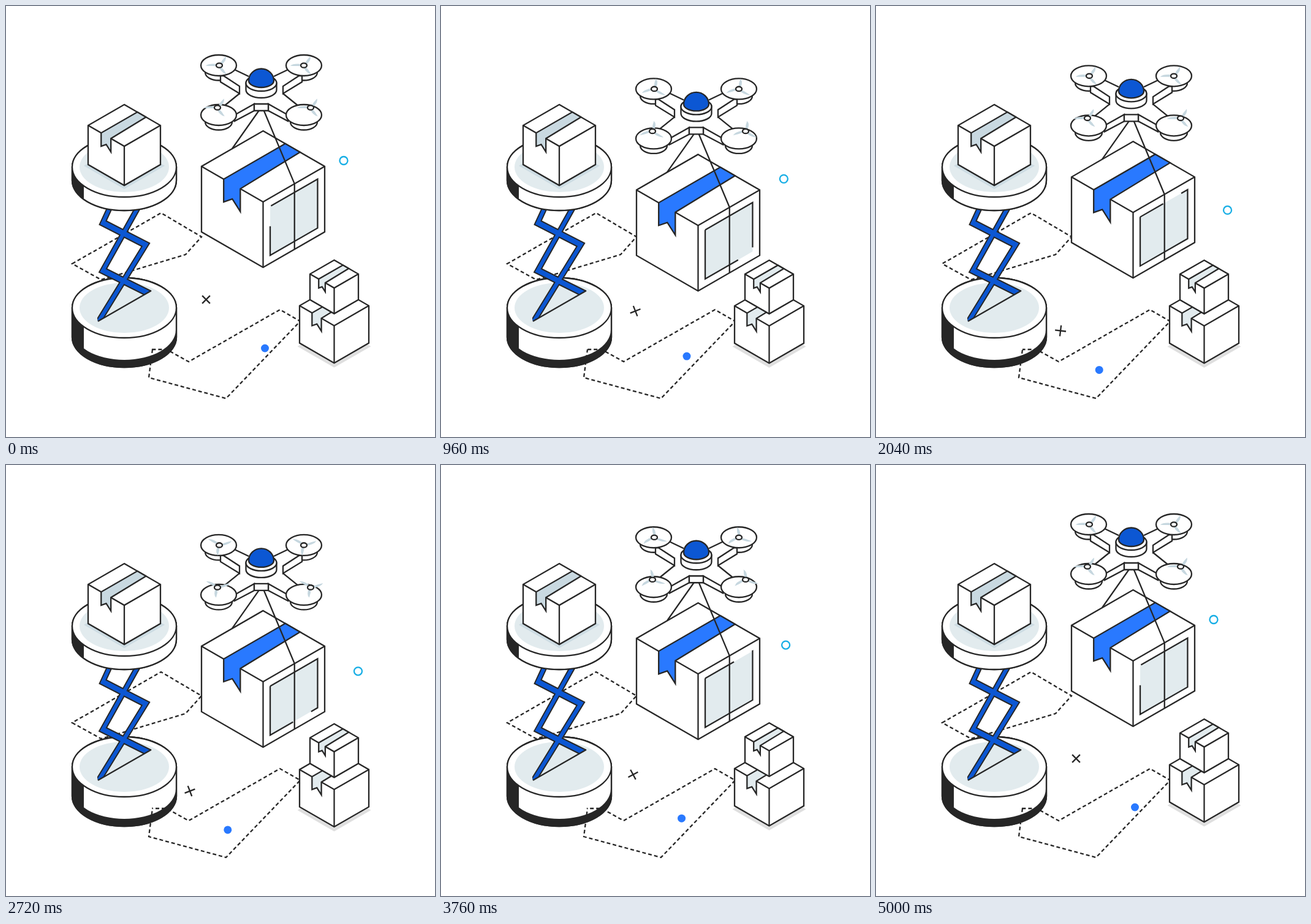
Recreate the animation shown at these times as an HTML page with a canvas. Size 700 px wide and 704 px high, loop 5040 ms.

```html
<!DOCTYPE html>
<html lang="en">
<head>
<meta charset="utf-8">
<title>Drone delivery</title>
<style>
html, body { margin: 0; width: 100%; height: 100%; overflow: hidden; background: #fff; }
canvas { display: block; }
</style>
</head>
<body>
<canvas id="stage" width="700" height="704"></canvas>
<script>
const ctx = document.getElementById('stage').getContext('2d');
const LOOP = 5040, SPAN = 5000, STEP = 40;
const TURN = Math.PI * 2, ISO = 0.577, LINE = 2.3;
const INK = '#262626', BLUE = '#0c57d3', BRIGHT = '#2979ff', PALE = '#e2ebee', TAPE = '#c9d9e1';

const smooth = u => u * u * (3 - 2 * u);

// Eased swing from 0 to 1 and back.
function swing(t, period, peak = period / 2) {
  const p = t % period;
  return smooth(p < peak ? p / peak : (period - p) / (period - peak));
}

function paint(fill, stroke, width = LINE) {
  if (fill) { ctx.fillStyle = fill; ctx.fill(); }
  if (stroke) { ctx.strokeStyle = stroke; ctx.lineWidth = width; ctx.stroke(); }
}

function trace(points, closed) {
  ctx.beginPath();
  for (const [x, y] of points) ctx.lineTo(x, y);
  if (closed) ctx.closePath();
}

function poly(points, fill, stroke = INK) {
  trace(points, true);
  paint(fill, stroke);
}

function line(...points) {
  trace(points, false);
  paint(null, INK);
}

function ellipse(x, y, rx, ry, fill, stroke = INK) {
  ctx.beginPath();
  ctx.ellipse(x, y, rx, ry, 0, 0, TURN);
  paint(fill, stroke);
}

// Outline of an upright solid with a round top and a round foot.
function capsule(x, y, rx, ry, h, fill, stroke = INK, footRy = ry) {
  ctx.beginPath();
  ctx.ellipse(x, y, rx, ry, 0, Math.PI, TURN);
  ctx.ellipse(x, y + h, rx, footRy, 0, 0, Math.PI);
  ctx.closePath();
  paint(fill, stroke);
}

function at(x, y, draw) {
  ctx.save();
  ctx.translate(x, y);
  draw();
  ctx.restore();
}

function diamond(x, y, r, fill) {
  const d = r * ISO;
  poly([[x, y - d], [x + r, y], [x, y + d], [x - r, y]], fill, null);
}

// Isometric carton; the tape runs over the top and ends in a notched flap.
function parcel(x, top, r, h, tape) {
  const d = r * ISO, mid = top + d, low = mid + d;
  poly([[x, top], [x + r, mid], [x + r, mid + h], [x, low + h], [x - r, mid + h], [x - r, mid]], '#fff');
  line([x - r, mid], [x, low], [x + r, mid]);
  line([x, low], [x, low + h]);
  const back = u => [x + r * u, top + d * u];
  const front = (u, drop) => [x - r + r * u, mid + d * u + r * drop];
  poly([back(0.36), back(0.6), front(0.63, 0), front(0.63, 0.37), front(0.5, 0.24),
    front(0.36, 0.37), front(0.36, 0)], tape);
}

function dashed(points, t) {
  ctx.setLineDash([6, 4]);
  ctx.lineDashOffset = -100 * t / SPAN;
  poly(points, null);
  ctx.setLineDash([]);
}

function platform(y, height, foot) {
  capsule(193, y, 85, 49, height, INK);
  ctx.save();
  ctx.beginPath();
  ctx.rect(127, y, 160, 200);
  ctx.clip();
  capsule(193, y, 84, 49, height - foot, '#fff', null);
  ctx.restore();
  capsule(193, y, 85, 49, height, null);
  ellipse(193, y, 85, 49, '#fff');
  ellipse(193, y, 73, 41, PALE, null);
}

function scissors() {
  const arms = [
    [[216, 328], [158, 432], [250, 478]],
    [[170, 328], [158, 354], [228, 390], [142, 530]]
  ];
  ctx.save();
  trace([[150, 515], [237, 465], [300, 300], [100, 300]], true);
  ctx.clip();
  // A flattened pen makes the shallow bars thicker than the steep ones.
  for (const [color, wide, tall] of [[INK, 8.5, 13], [BLUE, 4.5, 9]])
    for (const arm of arms) {
      trace(arm, false);
      ctx.save();
      ctx.scale(wide, tall);
      paint(null, color, 1);
      ctx.restore();
    }
  ctx.restore();
  line([150, 515], [237, 465]);
}

function lift() {
  platform(493, 48, 12);
  scissors();
  platform(263, 22, 0);
  diamond(193, 261, 66, '#cddce3');
  parcel(193, 161, 59, 64, TAPE);
}

function propeller(x, y, angle) {
  at(x, y, () => {
    ctx.save();
    ctx.scale(1, 0.75);
    ctx.rotate(angle);
    for (let i = 0; i < 3; i++) {
      ctx.beginPath();
      ctx.moveTo(2, -1);
      ctx.quadraticCurveTo(12, -4, 22, -4);
      ctx.quadraticCurveTo(17, 3, 2, 2);
      paint('#c6d7df');
      ctx.rotate(TURN / 3);
    }
    ctx.restore();
    ellipse(0, 0, 5, 3.7, '#fff');
  });
}

function mirrored(draw) {
  draw();
  ctx.save();
  ctx.translate(833, 0);
  ctx.scale(-1, 1);
  draw();
  ctx.restore();
}

function crate(t) {
  const r = 100.5, x = 419.5, top = 204;
  parcel(x, top, r, 107, BRIGHT);

  // A short gap travels around the window frame.
  const side = (u, v) => [x + r * u, top + r * ISO * (2 - u) + v];
  const pane = [side(0.115, 14), side(0.885, 14), side(0.885, 94), side(0.115, 94)];
  const rim = 2 * (80 + Math.hypot(0.77 * r, 0.77 * r * ISO)), gap = 34;
  poly(pane, PALE, null);
  ctx.setLineDash([rim - gap, gap]);
  ctx.lineDashOffset = -(rim * t * 3 / SPAN + 1.5);
  line(...pane, pane[0]);
  ctx.setLineDash([]);

  line([414, 169], [369, 233]);
  line([420, 169], side(0.51, 0), side(0.51, 107));
}

function drone(angle) {
  mirrored(() => {
    for (const y of [100, 181]) capsule(347, y, 22, 13, 8.5, '#fff');
  });
  const back = [[373, 104], [396, 115]];
  const waist = [[355, 164], [381, 143]];
  mirrored(() => poly([...back, [418, 115], [418, 160], [405, 160], [373, 179], ...waist,
    [381, 131], [355, 115]], '#fff', null));
  mirrored(() => {
    line(...back);
    line(...waist);
    poly([[355, 114], [381, 131], [381, 143], [350, 124], [350, 114]], '#fff');
    poly([[373, 178], [405, 160], [405, 171], [373, 188]], '#fff');
  });
  poly([[405, 160], [428, 160], [428, 171], [405, 171]], '#fff');

  capsule(416.5, 126, 25, 13, 11, '#fff');
  ellipse(416.5, 126, 25, 13, '#fff');
  capsule(416.5, 122, 20.5, 19.5, 0, BLUE, INK, 11);

  mirrored(() => {
    for (const y of [97, 178]) ellipse(347, y, 29, 17, '#fff');
  });
  for (const x of [348, 486]) propeller(x, 97, angle);
  for (const x of [345, 497]) propeller(x, 166, angle);
}

function stack() {
  diamond(535.5, 556, 60, '#dfdfdf');
  parcel(535.5, 457, 56.5, 61, PALE);
  parcel(535.5, 415, 39.5, 42, PALE);
}

function markers(t) {
  const s = swing(t, SPAN, 2440);
  ellipse(551 + 24.3 * s, 252.5 + 87.2 * s, 6.5, 6.5, null, '#17aee5');
  ellipse(422.5 - 62.8 * s, 559 + 38.2 * s, 6.5, 6.5, BRIGHT, null);
  at(326.5 - 27.4 * s, 479.5 + 54.9 * s, () => {
    ctx.rotate(TURN * (1 / 8 - 2 * s));
    line([-9, 0], [9, 0]);
    line([0, -9], [0, 9]);
  });
}

function render(t) {
  ctx.fillStyle = '#fff';
  ctx.fillRect(0, 0, 700, 704);
  dashed([[108, 421], [253, 338], [319, 377], [293, 406], [180, 440], [155, 447]], t);
  lift();
  dashed([[239, 561], [233, 607], [359, 641], [480, 515], [447, 496], [298, 581], [262, 561]], t);
  at(0, 41 * swing(t, SPAN / 3), () => {
    crate(t);
    drone(TURN * (0.19 - 9 * t / SPAN));
  });
  at(0, 13.2 * swing(t, SPAN / 5), stack);
  markers(t);
}

const start = performance.now();
function tick() {
  const t = (performance.now() - start) % LOOP;
  render(Math.floor(t / STEP) * STEP % SPAN);
  requestAnimationFrame(tick);
}
tick();
</script>
</body>
</html>
```
